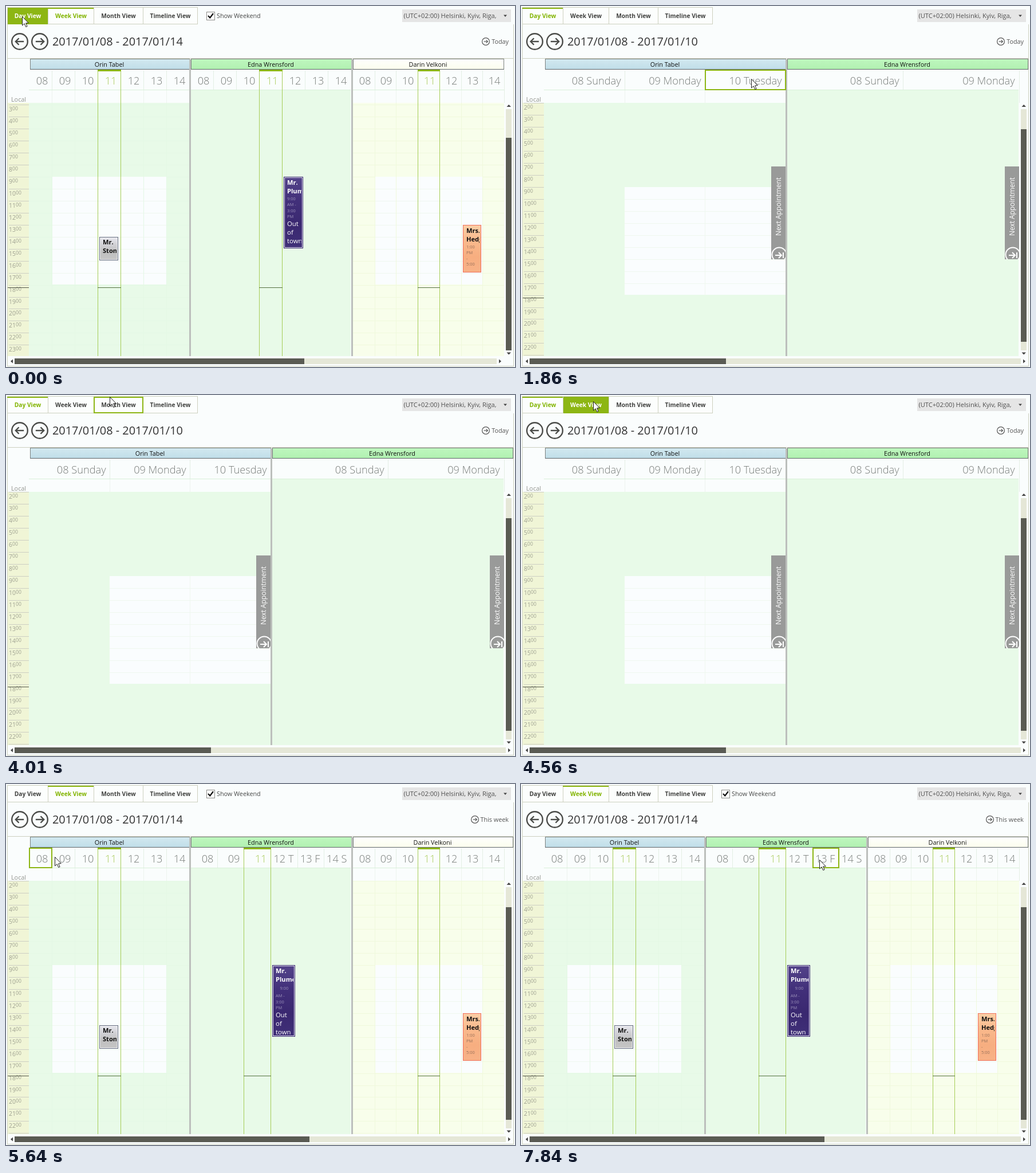
Write an HTML page with a canvas that moves like this. It is 889x630 px and loops after 7990 ms.

```html
<!DOCTYPE html>
<html lang="en">
<head>
<meta charset="utf-8">
<title>Scheduler</title>
<style>
html, body { margin: 0; width: 100%; height: 100%; overflow: hidden; background: #fafdfd; }
canvas { display: block; }
</style>
</head>
<body>
<canvas id="stage" width="889" height="630"></canvas>
<script>
const ctx = document.getElementById('stage').getContext('2d');
const LOOP = 7990, ROW = 20.95;
const GREEN = '#8db614', PAGE = '#fafdfd', DARK = '#4b4c49', FRAME = '#cdd0bf';

function rect(x, y, w, h, color) {
  ctx.fillStyle = color;
  ctx.fillRect(x, y, w, h);
}

function outline(x, y, w, h, color, width = 1) {
  ctx.strokeStyle = color;
  ctx.lineWidth = width;
  ctx.strokeRect(x + width / 2, y + width / 2, w - width, h - width);
}

function text(s, x, cy, size, color, weight = 400, align = 'left') {
  ctx.font = `${weight} ${size}px "Open Sans", "Noto Sans", sans-serif`;
  ctx.textAlign = align;
  ctx.fillStyle = color;
  ctx.fillText(s, x, cy + size * 0.35);
}

function polyline(points, color, width) {
  ctx.beginPath();
  points.forEach(([x, y]) => ctx.lineTo(x, y));
  ctx.strokeStyle = color;
  ctx.lineWidth = width;
  ctx.stroke();
}

function polygon(points, color) {
  ctx.beginPath();
  points.forEach(([x, y]) => ctx.lineTo(x, y));
  ctx.closePath();
  ctx.fillStyle = color;
  ctx.fill();
}

function clipped(x, y, w, h, draw) {
  ctx.save();
  ctx.beginPath();
  ctx.rect(x, y, w, h);
  ctx.clip();
  draw();
  ctx.restore();
}

function fade(y0, y1, ...colors) {
  const g = ctx.createLinearGradient(0, y0, 0, y1);
  colors.forEach((c, i) => g.addColorStop(i / (colors.length - 1), c));
  return g;
}

function ring(x, y, r, color, width) {
  ctx.beginPath();
  ctx.arc(x, y, r, 0, Math.PI * 2);
  ctx.strokeStyle = color;
  ctx.lineWidth = width;
  ctx.stroke();
}

function circledArrow(x, y, r, dir, color, width) {
  ring(x, y, r, color, width);
  const a = r * 0.52, tip = x + dir * a;
  polyline([[x - dir * a, y], [tip, y]], color, width);
  polyline([[tip - dir * a * 0.8, y - a * 0.8], [tip, y], [tip - dir * a * 0.8, y + a * 0.8]], color, width);
}

// Views
const edges = (a, b, n) => Array.from({ length: n + 1 }, (_, i) => Math.round(a + (b - a) * i / n));
const WEEK_DAYS = ['08', '09', '10', '11', '12', '13', '14'];
const LOOKS = [
  { name: 'Orin Tabel', head: ['#d3e9f0', '#bfdde8'], fill: '#e8fae8', line: '#e4f8e5' },
  { name: 'Edna Wrensford', head: ['#bff7bf', '#b0f0b0'], fill: '#e8fae8', line: '#e8fae8', tinted: true },
  { name: 'Darin Velkoni', head: ['#ffffff', '#fbfdec'], fill: '#f8feeb', line: '#f0f9dc' }
];
const panel = (look, x, end, cols, days, extra) => ({ ...LOOKS[look], x, end, cols, days, ...extra });

function weekView(extra, middleDays, lastEnd) {
  const n = middleDays.length;
  return {
    title: '2017/01/08 - 2017/01/14', week: true, ...extra,
    panels: [
      panel(0, 42, 321, edges(40, 320, 7), WEEK_DAYS, { work: [1, 6], today: 3 }),
      panel(1, 323, 604, edges(322, 602, n), middleDays, { today: middleDays.indexOf('11') }),
      panel(2, 606, lastEnd, edges(606, 870, 7), WEEK_DAYS, { work: [1, 6], today: 3 })
    ]
  };
}

const firstWeek = weekView(
  { nine: 298, now: 491, vThumb: 230, hThumb: 521, jump: 'Today', event: { x: 485, w: 34 } },
  WEEK_DAYS, 870);
const lastWeek = weekView(
  { nine: 316, now: 509, vThumb: 215, hThumb: 530, jump: 'This week', event: { x: 465, w: 40, wide: true } },
  ['08', '09', '11', '12 T', '13 F', '14 S'], 886);
const dayView = {
  title: '2017/01/08 - 2017/01/10', nine: 316, now: 509, vThumb: 215, hThumb: 358, jump: 'Today',
  panels: [
    panel(0, 42, 463, [40, 181, 321, 462], ['08 Sunday', '09 Monday', '10 Tuesday'], { work: [1, 3] }),
    panel(1, 465, 886, [465, 667, 869], ['08 Sunday', '09 Monday'], {})
  ]
};

// Pointer: [start, end, steps, x0, y0, x1, y1, ease power]; no position means hidden
const MOVES = [
  [0, 0, 1, 28, 18], [120, 120, 1, 27, 23], [240, 240, 1, 24, 25], [640],
  [1170, 2130, 8, 130, 126, 469, 127, 1.3],
  [2280, 2690, 4, 525, 127, 800, 127], [2820],
  [3100, 3220, 2, 822, 155, 761, 159],
  [3500, 4000, 5, 690, 130, 181, 3], [4130, 4280, 2, 150, 6, 127, 11],
  [4560, 4560, 1, 126, 11],
  [4830, 5490, 6, 122, 30, 58, 126],
  [5640, 6180, 5, 85, 127, 228, 128],
  [6450, 6685, 3, 243, 133, 281, 135], [6840, 6840, 1, 345, 132],
  [7150, 7835, 6, 375, 132, 521, 132]
];

function pointerAt(t) {
  const [start, end, steps, x0, y0, x1 = x0, y1 = y0, power = 1] = MOVES.filter(m => m[0] <= t).pop();
  if (!steps) return null;
  const last = steps - 1;
  const u = last ? Math.min(last, Math.floor((t - start) / (end - start) * last)) / last : 0;
  const e = 1 - (1 - u) ** power;
  return { x: Math.round(x0 + (x1 - x0) * e), y: Math.round(y0 + (y1 - y0) * e) };
}

// Toolbar
const TABS = [['Day View', 2, 73], ['Week View', 73, 153], ['Month View', 153, 239], ['Timeline View', 239, 334]];

function drawTabs(selected, pressed, pointer) {
  TABS.forEach(([label, a, b], i) => {
    const active = i === selected, width = b - a + 1;
    rect(a, 2, width, 30, '#fcfefd');
    outline(a, 2, width, 30, FRAME);
    if (active) rect(a, 3, width, 2, GREEN);
    if (i === pressed) rect(a + 1, 3, width - 1, 29, GREEN);
    text(label, (a + b) / 2 + 0.5, 17, 10.2, i === pressed ? '#fff' : active ? '#82b400' : '#40413f', 700, 'center');
  });
  const hover = pointer && pointer.y < 32 && TABS.findIndex(([, a, b]) => pointer.x >= a && pointer.x < b);
  if (hover > 0 && hover !== selected && hover !== pressed) {
    const [, a, b] = TABS[hover];
    outline(a, 3, b - a + 1, 29, GREEN, 2);
  }
}

function drawToolbar(view) {
  if (view.week) {
    rect(350, 10, 15, 15, '#fff');
    outline(350, 10, 15, 15, '#8c8c88');
    polyline([[353, 17], [356.3, 20.5], [362, 13]], '#111', 2.2);
    text('Show Weekend', 368, 17, 10.8, '#484948');
  }
  rect(692, 6, 190, 22, '#e5e5e5');
  text('(UTC+02:00) Helsinki, Kyiv, Riga,', 694.5, 17, 11.1, '#505050');
  polygon([[869, 15.5], [875, 15.5], [872, 19]], '#444');
  circledArrow(24, 62, 13.8, -1, DARK, 2.4);
  circledArrow(59, 62, 13.8, 1, DARK, 2.4);
  text(view.title, 81, 62, 19.9, '#333');
  circledArrow(view.jump === 'Today' ? 838 : 819, 62, 6.4, 1, '#555', 1.2);
  text(view.jump, 878, 62, 10.8, '#555', 400, 'right');
}

// Calendar
const hourTop = (view, h) => view.nine + (h - 9) * ROW;

function drawRuler(view) {
  text('Local', 9, 163, 10.8, '#92948e');
  clipped(3, 169, 37, 442, () => {
    rect(3, 169, 37, 442, '#f0f5d6');
    for (let h = 2; h < 24; h++) {
      const y = Math.round(hourTop(view, h));
      rect(5, y, 35, 1, '#cdcfc3');
      text(String(h), 5, y + 8, 10.4, '#9fa191');
      text('00', h < 10 ? 11 : 17, y + 6.5, 8.6, '#9fa191');
    }
  });
  rect(3, view.now, 37, 1, '#55584a');
}

function drawPanel(p, view) {
  const left = p.cols[0], right = p.cols[p.cols.length - 1], width = right - left;
  const top = p.tinted ? 147 : 169;
  rect(left, top, width, 611 - top, p.fill);
  clipped(left, 169, width, 442, () => {
    const from = view.nine, height = 9 * ROW;
    if (view.week && !p.tinted) {
      for (let h = 2; h < 24; h++) rect(left, Math.round(hourTop(view, h)), width, 1, p.line);
    }
    if (!p.work) return;
    const [a, b] = p.work.map(i => p.cols[i]);
    rect(a, from, b - a, Math.floor(height), '#fafdfe');
    for (let h = 10; h < 18; h++) rect(a, Math.round(hourTop(view, h)), b - a, 1, '#eff7ef');
  });
  p.cols.slice(1, -1).forEach((x, i) => {
    rect(x, 112, 1, 35, '#e4efe5');
    if (!p.tinted) rect(x, 147, 1, 22, '#edf4ee');
    if (view.week) rect(x, 169, 1, 442, p.line);
    else if (p.work && i > 0) rect(x, view.nine, 1, 9 * ROW, '#eff7ef');
  });
  rect(left, 146, width, 1, '#d9f0d9');

  rect(p.x, 92, p.end - p.x, 19, fade(92, 111, ...p.head));
  outline(p.x, 92, p.end - p.x, 19, '#7b8180');
  rect(p.x, 110, p.end - p.x, 1, '#60666a');
  text(p.name, (p.x + p.end) / 2 - 1, 102, 10.8, '#111', 400, 'center');

  p.days.forEach((d, i) => {
    text(d, p.cols[i + 1] - 6.5, 130.5, 18.2, i === p.today ? '#a9cb58' : '#777b78', 300, 'right');
  });
  if (p.today !== undefined) {
    const a = p.cols[p.today], b = p.cols[p.today + 1];
    rect(a, 112, 1, 499, '#a6cd58');
    rect(b, 112, 1, 499, '#a6cd58');
    rect(a, 111, b - a + 1, 3, GREEN);
    rect(a, view.now, b - a + 1, 1, '#557040');
  }
}

function drawHover(view, pointer) {
  if (!pointer || pointer.y < 111 || pointer.y > 147) return;
  const x = pointer.x - 8;
  for (const { cols } of view.panels) {
    const i = cols.findIndex((c, k) => x >= c && x < cols[k + 1]);
    if (i >= 0) outline(cols[i], 111, cols[i + 1] - cols[i] + 1, 36, GREEN, 2);
  }
}

// Lines are [text, offset y, style, offset x]
const STYLES = { bold: [11.1, 700], small: [7.4, 400], plain: [11.4, 400] };

function drawEvent(x, y, w, h, fill, border, ink, faint, lines, innerRing) {
  rect(x, y, w, h, fade(y, y + h, ...fill));
  outline(x, y, w, h, border);
  if (innerRing) outline(x + 1, y + 1, w - 2, h - 2, innerRing);
  clipped(x + 3, y + 2, w - 6, h - 4, () => {
    lines.forEach(([s, dy, style, dx = 6]) => {
      const [size, weight] = STYLES[style];
      text(s, x + dx, y + dy, size, style === 'small' ? faint : ink, weight);
    });
  });
}

function drawEvents(view) {
  const y = view.nine;
  const { x, w, wide } = view.event;
  drawEvent(163, y + 105, 33, 41, ['#e9e9f0', '#d0d0d4', '#c0c0c0', '#c6c6c6'], '#636a7e', '#111', '', [
    ['Mr.', 9.5, 'bold'], ['Stone', 24.5, 'bold']
  ], '#f1f1f4');
  const d = wide ? 5 : 0;
  drawEvent(x, y, w, 125, ['#54448a', '#42307a', '#3a2870', '#403078'], '#33236a', '#fff', '#9d93bb', [
    ['Mr.', 10, 'bold'], ['Plume', 25, 'bold'],
    ['9:00', 38 + d / 2, 'small', wide ? 13.5 : 6], ['AM -', 48 + d, 'small'],
    ['3:00', 59 + d, 'small'], ['PM', 69 + d, 'small'],
    ['Out', 82 + d, 'plain'], ['of', 97 + d, 'plain'], ['town', 112 + d, 'plain']
  ], '#e9e5f4');
  drawEvent(798, y + 84, 32, 83, ['#fbcfa6', '#f9b98c', '#f7ae80', '#f8b287'], '#f0705a', '#111', '#97705a', [
    ['Mrs.', 10, 'bold'], ['Hedge', 25, 'bold'],
    ['1:00', 38, 'small'], ['PM', 48, 'small'], ['-', 58, 'small'], ['5:00', 68, 'small']
  ]);
}

function drawNextButton(x) {
  rect(x, 280, 25, 162, '#999a99');
  ctx.save();
  ctx.translate(x + 13, 350);
  ctx.rotate(-Math.PI / 2);
  text('Next Appointment', 0, 0, 11.9, '#fff', 400, 'center');
  ctx.restore();
  clipped(x, 280, 25, 162, () => {
    ring(x + 14, 434, 12.5, '#fff', 2);
    polyline([[x + 7, 435], [x + 18, 435]], '#fff', 2);
    polyline([[x + 13, 430], [x + 18, 435], [x + 13, 440]], '#fff', 2);
    rect(x + 20, 430, 2, 10, '#fff');
  });
}

function drawScrollbars(view) {
  rect(873, 180, 10, 421, '#e5e7d7');
  rect(873, view.vThumb, 10, 371, '#5a5b53');
  polygon([[874.5, 176], [882, 176], [878.2, 172]], '#444');
  polygon([[874.5, 604.5], [882, 604.5], [878.2, 608.5]], '#444');
  const end = view.panels[view.panels.length - 1].end;
  rect(15, 615, end - 28, 10, '#e5e7d7');
  rect(15, 615, view.hThumb - 15, 10, '#5a5b53');
  polygon([[12, 616.5], [12, 623.5], [8, 620]], '#444');
  polygon([[end - 9, 616.5], [end - 9, 623.5], [end - 5, 620]], '#444');
}

function drawPointer({ x, y }) {
  const shape = [[0, 0], [0, 15.5], [3.6, 12.2], [6.2, 18], [8.6, 17], [6.1, 11.4], [10.8, 11.2]]
    .map(([a, b]) => [x + a + 0.5, y + b + 0.5]);
  polygon(shape, '#fff');
  polyline([...shape, shape[0]], '#222', 1);
}

function draw(t) {
  const view = t < 120 ? firstWeek : t < 4680 ? dayView : lastWeek;
  const pressed = t < 120 ? 0 : t >= 4560 && t < 4680 ? 1 : -1;
  const pointer = pointerAt(t);
  rect(0, 0, 889, 630, PAGE);
  rect(2, 91, 885, 1, FRAME);
  rect(2, 32, 1, 597, FRAME);
  rect(886, 32, 1, 597, FRAME);
  rect(2, 628, 885, 1, FRAME);
  drawTabs(view.week ? 1 : 0, pressed, pointer);
  drawToolbar(view);
  drawRuler(view);
  view.panels.forEach(p => drawPanel(p, view));
  view.panels.slice(1).forEach(p => rect(p.x - 3, 93, 3, 518, '#bcbfbc'));
  rect(870, 112, 1, 57, '#e4efe5');
  if (view.week) drawEvents(view);
  else [437, 845].forEach(drawNextButton);
  drawScrollbars(view);
  drawHover(view, pointer);
  if (pointer) drawPointer(pointer);
}

const began = performance.now();
function tick() {
  draw((performance.now() - began) % LOOP);
  requestAnimationFrame(tick);
}
tick();
</script>
</body>
</html>
```
